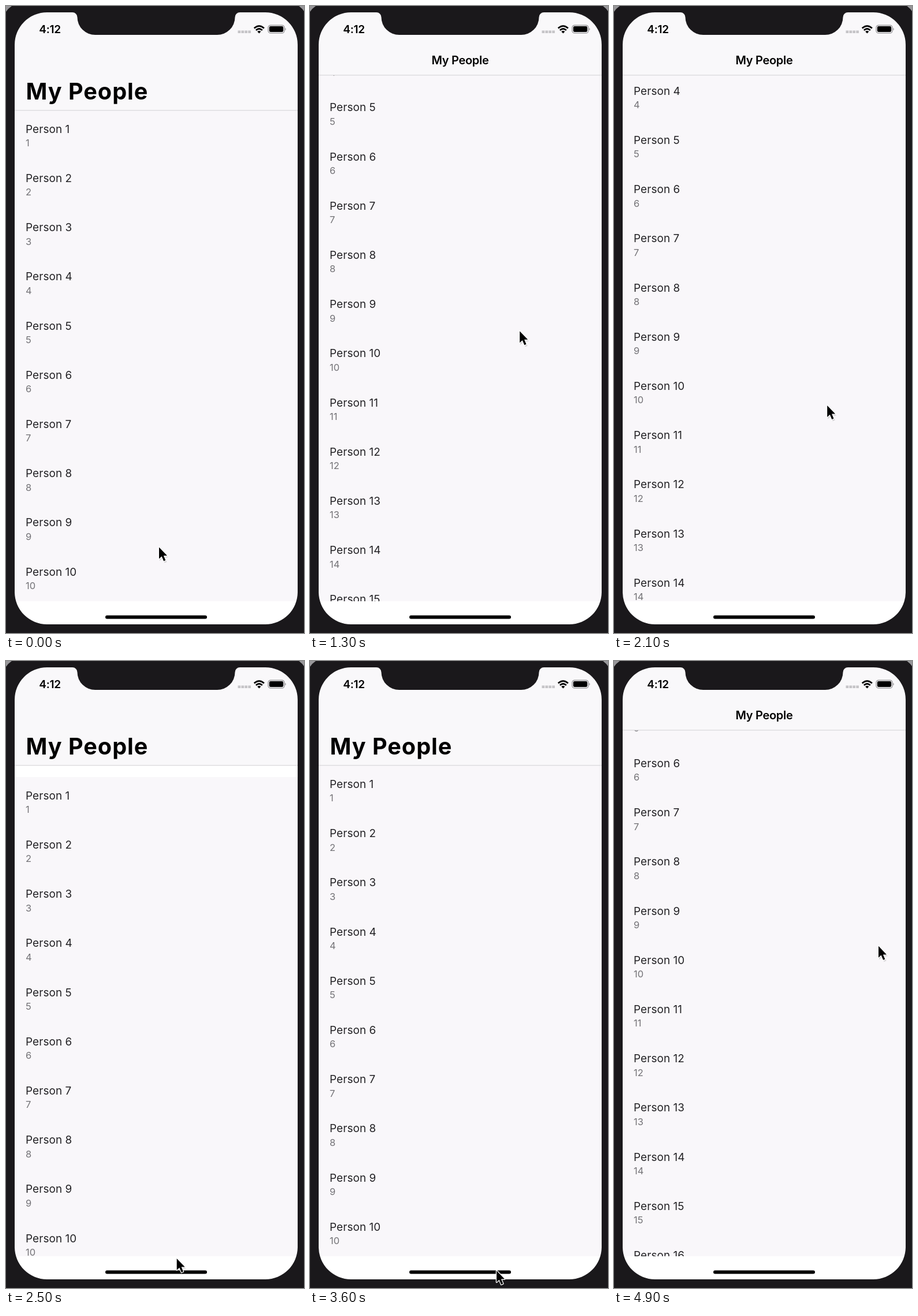
An HTML page that plays this animation: 516x1086 px, repeating every 5000 ms.

```html
<!DOCTYPE html>
<html lang="en">
<head>
<meta charset="utf-8">
<title>My People</title>
<style>
  html, body { margin: 0; width: 100%; height: 100%; overflow: hidden; background: #1a181b; }
  svg { display: block; width: 516px; height: 1086px; }
  text { font-family: Inter, Roboto, sans-serif; fill: #000; }
  .name { font-size: 18.9px; letter-spacing: .1px; fill: #232225; }
  .note { font-size: 16.5px; fill: #747377; }
  .large { font-size: 39.6px; font-weight: 700; letter-spacing: 1px; }
  .small { font-size: 20px; font-weight: 600; letter-spacing: -.3px; text-anchor: middle; }
  .clock { font-size: 19px; font-weight: 600; letter-spacing: -.3px; text-anchor: middle; }
</style>
</head>
<body>
<svg viewBox="0 0 516 1086">
  <defs>
    <clipPath id="listArea"><path d="M15 11H505V1031H15Z"/></clipPath>
    <clipPath id="titleArea"><path d="M15 120H505V240H15Z"/></clipPath>
  </defs>

  <rect width="516" height="1086" fill="#fff"/>
  <g clip-path="url(#listArea)">
    <g id="list"><rect x="15" y="181" width="490" height="2600" fill="#f9f7fa"/></g>
  </g>

  <rect id="bar" x="15" y="11" width="490" fill="#f9f8fa"/>
  <rect id="line" x="15" width="490" height="1.2" fill="#d8d7da"/>
  <g clip-path="url(#titleArea)"><text id="large" class="large" x="34.5">My People</text></g>
  <text id="small" class="small" x="260" y="101">My People</text>

  <text class="clock" x="76" y="47.3">4:12</text>
  <path d="M401.500 44.800H424" stroke="#c5c4c7" stroke-width="4.6" stroke-dasharray="4.7 1.200"/>
  <g fill="none" stroke="#000" stroke-width="2.7">
    <path d="M429.7 38.6Q438.3 30.6 446.9 38.6"/>
    <path d="M432.8 42Q438.3 37 443.8 42"/>
  </g>
  <path d="M435.2 44.2Q438.3 41.7 441.4 44.2L438.3 47.5Z"/>
  <rect x="454" y="33.3" width="28" height="13.6" rx="4" fill="none" stroke="#8b8a8d" stroke-width="1.2"/>
  <rect x="455.8" y="35.1" width="24.4" height="10" rx="2.4"/>
  <path d="M483.4 37.8Q486 40.1 483.4 42.4Z" fill="#8b8a8d"/>
  <rect x="172" y="1055.6" width="176" height="5.8" rx="2.9"/>

  <path fill="#1a181b" fill-rule="evenodd" d="M0 0H516V1086H0Z
    M71 11H115A8.500 8.500 0 0 1 123.500 19.500A31 30.500 0 0 0 154.500 50H365.500A31 30.500 0 0 0 396.500 19.500
    A8.500 8.500 0 0 1 405 11H449A56 56 0 0 1 505 67V1015A56 56 0 0 1 449 1071H71A56 56 0 0 1 15 1015V67A56 56 0 0 1 71 11Z"/>
  <path fill="#98979a" d="M0 0H10Q4 4 0 10ZM516 0H507Q513 4 516 9Z"/>

  <g id="pointer">
    <path d="M1 3V24L6 19.500 9.500 27.500 13.500 26 10 18H16Z" fill="#000" opacity=".15"/>
    <path d="M0 .5V20.500L4.600 16.300 8.100 24.500 11.300 23.100 7.900 15.100H14Z"
          stroke="#fff" stroke-width="2.6" stroke-linejoin="round" paint-order="stroke"/>
  </g>
</svg>
<script>
  const LOOP = 5000, STEP = 100, ROW = 85.2;
  const BAR_TALL = 181, BAR_SHORT = 120;
  const PULL_UP = 0, PULL_DOWN = 1780, RETURN = 3440, FLICK = 3740;
  const $ = id => document.getElementById(id);
  const clamp = (v, lo, hi) => Math.min(hi, Math.max(lo, v));

  // Distance covered by a timed move, and by one that slows down exponentially.
  const move = (t, start, duration, distance, power = 1) =>
    distance * clamp((t - start) / duration, 0, 1) ** power;
  const settle = (t, start, decay, distance) =>
    distance * (1 - Math.exp(-Math.max(0, t - start) / decay));

  // Drag up, drag down past the top, bounce back, flick up.
  const scrollAt = t =>
    move(t, PULL_UP, 1710, 535, 1.265) - move(t, PULL_DOWN + 70, 650, 555)
    + settle(t, 2500, 230, 20) + settle(t, FLICK, 354, 480);

  const pointerX = t =>
    265 + move(t, PULL_UP, 1710, 163, 1.85) - move(t, PULL_DOWN, 800, 147)
    + move(t, RETURN, 1460, 177, 0.65);

  const pointerY = t =>
    937 - move(t, PULL_UP, 1710, 520, 1.2) + move(t, PULL_DOWN, 800, 686)
    - move(t, RETURN, FLICK - RETURN, 167, 2) - settle(t, FLICK, 314, 454);

  function addText(className, y, content) {
    const el = document.createElementNS('http://www.w3.org/2000/svg', 'text');
    el.setAttribute('class', className);
    el.setAttribute('x', 34);
    el.setAttribute('y', y);
    el.textContent = content;
    $('list').append(el);
  }
  for (let i = 0; i < 22; i++) {
    addText('name', 219.8 + i * ROW, `Person ${i + 1}`);
    addText('note', 243.2 + i * ROW, i + 1);
  }

  function draw(t) {
    const scroll = scrollAt(t);
    const bottom = clamp(BAR_TALL - scroll, BAR_SHORT, BAR_TALL);
    const collapsed = clamp((scroll - 35) / 40, 0, 1);
    $('list').setAttribute('transform', `translate(0 ${-scroll})`);
    $('bar').setAttribute('height', bottom - 11);
    $('line').setAttribute('y', bottom - 0.8);
    $('large').setAttribute('y', bottom - 19.5);
    $('large').setAttribute('opacity', 1 - collapsed);
    $('small').setAttribute('opacity', collapsed);
    $('pointer').setAttribute('transform', `translate(${pointerX(t)} ${pointerY(t)})`);
  }

  function tick() {
    draw(Math.floor(performance.now() % LOOP / STEP) * STEP);
    requestAnimationFrame(tick);
  }
  tick();
</script>
</body>
</html>
```
